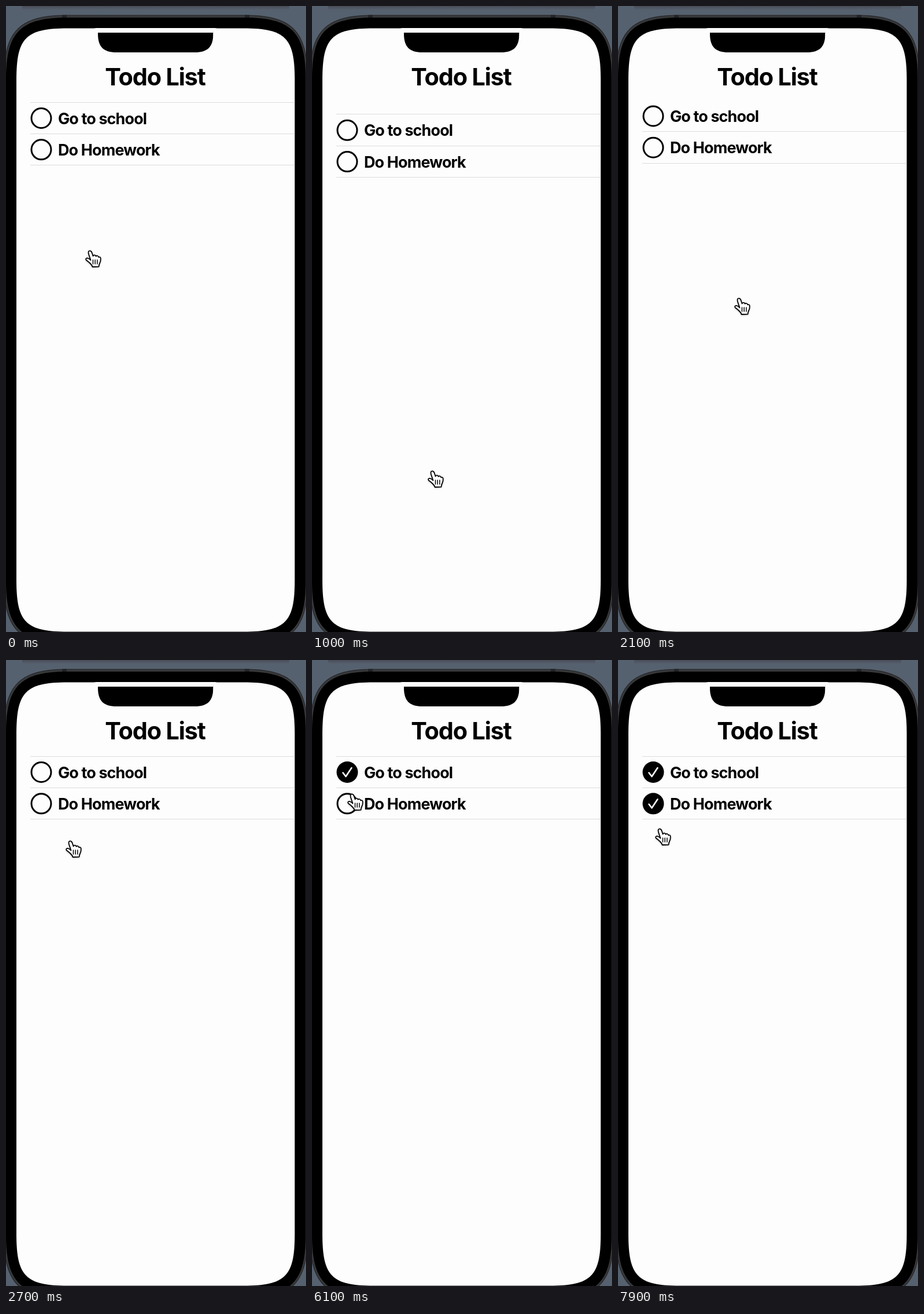
Animation, 519 px wide and 1080 px high, one loop 8 s. Source, as an HTML page with a canvas:

```html
<!DOCTYPE html>
<html lang="en">
<head>
<meta charset="utf-8">
<title>Todo List</title>
<style>
  html, body { margin: 0; width: 100%; height: 100%; overflow: hidden; background: #56616f; }
  canvas { display: block; width: 519px; height: 1080px; }
</style>
</head>
<body>
<canvas id="stage" width="519" height="1080"></canvas>
<script>
const ctx = document.getElementById('stage').getContext('2d');
const LOOP = 8000, STEP = 100;
const PAPER = '#fdfdfd', RIM = '#222325';
const FONT = 'Inter, "Liberation Sans", sans-serif';
const LIST_TOP = 166, ROW = 54.3, VIEW = 914;

const tasks = [
  { name: 'Go to school', doneAt: 3700 },
  { name: 'Do Homework', doneAt: 7000 }
];

// the pointer rests between moves; a drag also pulls the list
const home = { x: 137, y: 421 };
const moves = [];
const move = (from, to, x, y, drag = false) => moves.push({ from, to, x, y, drag });

move(0, 200, 193, 428);
move(400, 500, 190, 115);
move(500, 700, 200, 801, true);
move(1400, 1650, 201, 128, true);
move(1700, 2100, 201, 503);
move(2200, 2700, 103, 311);
move(2700, 3200, 54, 180);
move(3800, 4100, 28, 386);
move(4500, 4600, -21, 518);
move(4600, 5400, 62, 212);
move(5400, 5600, 62, 202);
move(5800, 6100, 61, 230);
move(6200, 6600, 58, 248);
move(6900, 7400, 62, 431);
move(7400, 7900, 64, 290);

function pointer(t) {
  let { x, y } = home;
  for (const m of moves) {
    if (t <= m.from) break;
    const k = Math.min(1, (t - m.from) / (m.to - m.from));
    x += (m.x - x) * k;
    y += (m.y - y) * k;
  }
  return { x, y };
}

function rubber(d) {
  const pull = Math.abs(d) * 0.55;
  return Math.sign(d) * pull * VIEW / (pull + VIEW);
}

// rubber band while dragging, critically damped return afterwards
function scrollOffset(t) {
  const drag = moves.filter(m => m.drag && t >= m.from).pop();
  if (!drag) return 0;
  const end = Math.min(t, drag.to);
  const pull = rubber(pointer(end).y - pointer(drag.from).y);
  const s = 14 * (t - end) / 1000;
  const y = pull * (1 + s) * Math.exp(-s);
  return Math.abs(y) < 0.2 ? 0 : y;
}

// box whose corners reach r along each side; a lower bend gives a tighter corner
function smoothBox(x, y, w, h, r, bend, color) {
  const c = r * bend, R = x + w, B = y + h;
  ctx.fillStyle = color;
  ctx.beginPath();
  ctx.moveTo(x + r, y);
  ctx.lineTo(R - r, y);
  ctx.bezierCurveTo(R - c, y, R, y + c, R, y + r);
  ctx.lineTo(R, B - r);
  ctx.bezierCurveTo(R, B - c, R - c, B, R - r, B);
  ctx.lineTo(x + r, B);
  ctx.bezierCurveTo(x + c, B, x, B - c, x, B - r);
  ctx.lineTo(x, y + r);
  ctx.bezierCurveTo(x, y + c, x + c, y, x + r, y);
  ctx.fill();
}

function text(str, x, y, size, spacing, align) {
  ctx.font = `700 ${size}px ${FONT}`;
  ctx.letterSpacing = spacing + 'px';
  ctx.textAlign = align;
  ctx.fillStyle = '#000';
  ctx.fillText(str, x, y);
}

function notch(left, right, top, bottom) {
  const flare = 8;
  ctx.save();
  ctx.beginPath();
  ctx.rect(left, top - 1, right - left, bottom);
  ctx.clip();
  smoothBox(left, top - 40, right - left, bottom - top + 40, 32, 0.3, '#000');
  ctx.restore();
  ctx.beginPath();
  ctx.moveTo(left - flare, top);
  ctx.quadraticCurveTo(left, top, left, top + flare);
  ctx.lineTo(right, top + flare);
  ctx.quadraticCurveTo(right, top, right + flare, top);
  ctx.fill();
}

function phone() {
  ctx.fillStyle = '#56616f';
  ctx.fillRect(0, 0, 519, 1080);
  const shade = ctx.createLinearGradient(0, 0, 0, 7);
  shade.addColorStop(0, '#4a4d58');
  shade.addColorStop(1, 'rgba(74,77,88,0)');
  ctx.fillStyle = shade;
  ctx.fillRect(28, 0, 462, 7);

  smoothBox(-4, 15.5, 526, 1087, 110, 0.245, RIM);
  smoothBox(-3, 16.5, 524, 1085, 109, 0.245, '#37383a');
  ctx.fillStyle = RIM;
  for (const x of [97, 413]) ctx.fillRect(x, 15.5, 8, 5);
  smoothBox(0, 20, 518.5, 1078, 106, 0.235, '#000');
  smoothBox(18, 38.5, 481.5, 1041, 89, 0.18, PAPER);
  notch(159, 358.5, 38, 80);
}

function check(x, y, done) {
  ctx.beginPath();
  ctx.arc(x, y, done ? 18.5 : 17, 0, Math.PI * 2);
  ctx.lineCap = ctx.lineJoin = 'round';
  if (!done) {
    ctx.lineWidth = 3;
    ctx.strokeStyle = '#000';
    ctx.stroke();
    return;
  }
  ctx.fillStyle = '#000';
  ctx.fill();
  ctx.beginPath();
  ctx.moveTo(x - 7.5, y + 1);
  ctx.lineTo(x - 2.5, y + 7.5);
  ctx.lineTo(x + 7.5, y - 7.5);
  ctx.lineWidth = 2.6;
  ctx.strokeStyle = PAPER;
  ctx.stroke();
}

function list(t) {
  const top = LIST_TOP + scrollOffset(t);
  ctx.save();
  ctx.beginPath();
  ctx.rect(18, LIST_TOP, 481.5, VIEW);
  ctx.clip();
  ctx.fillStyle = '#dcdcdc';
  for (let i = 0; i <= tasks.length; i++) {
    ctx.fillRect(42, Math.floor(top + i * ROW), 457.5, 1);
  }
  tasks.forEach((task, i) => {
    const y = top + i * ROW + 27.5;
    check(61, y, t >= task.doneAt);
    text(task.name, 90, y + 10, 27, -0.9, 'left');
  });
  ctx.restore();
}

const hand = new Path2D(
  'M9.5 17.5 L6 7 Q4.6 2 7.6 1.4 Q10.4 1 11.6 4.5 L13.6 10.5 ' +
  'Q14.2 8.4 16.2 8.6 Q18.2 8.9 18.6 10.8 Q19.6 9.4 21.3 10 Q23 10.6 23.2 12.4 ' +
  'Q26.2 11.2 26.8 14.5 Q27.2 19 25 23 Q23.6 25.7 23.6 28.6 L12.6 29 ' +
  'Q12 26.3 8.6 23 Q5 19.5 1.6 17.2 Q0.4 14.6 2.8 14 Q5.4 13.6 9.5 17.5 Z');

function cursor(t) {
  const { x, y } = pointer(t);
  ctx.save();
  ctx.translate(x, y);
  ctx.lineJoin = ctx.lineCap = 'round';
  ctx.save();
  ctx.shadowColor = 'rgba(0,0,0,0.4)';
  ctx.shadowBlur = 3;
  ctx.shadowOffsetY = 1.5;
  ctx.fillStyle = '#fff';
  ctx.fill(hand);
  ctx.restore();
  ctx.strokeStyle = '#000';
  ctx.lineWidth = 1.8;
  ctx.stroke(hand);
  ctx.lineWidth = 1.5;
  ctx.beginPath();
  for (let i = 0; i < 3; i++) {
    ctx.moveTo(13.5 + i * 3.7, 17);
    ctx.lineTo(13.5 + i * 3.7, 24);
  }
  ctx.stroke();
  ctx.restore();
}

function draw(now) {
  const t = Math.floor((now % LOOP) / STEP) * STEP;
  phone();
  text('Todo List', 258, 136.5, 41.5, -1.25, 'center');
  list(t);
  cursor(t);
}

let start;
function frame(now) {
  start ??= now;
  draw(now - start);
  requestAnimationFrame(frame);
}
draw(0);
requestAnimationFrame(frame);
</script>
</body>
</html>
```
